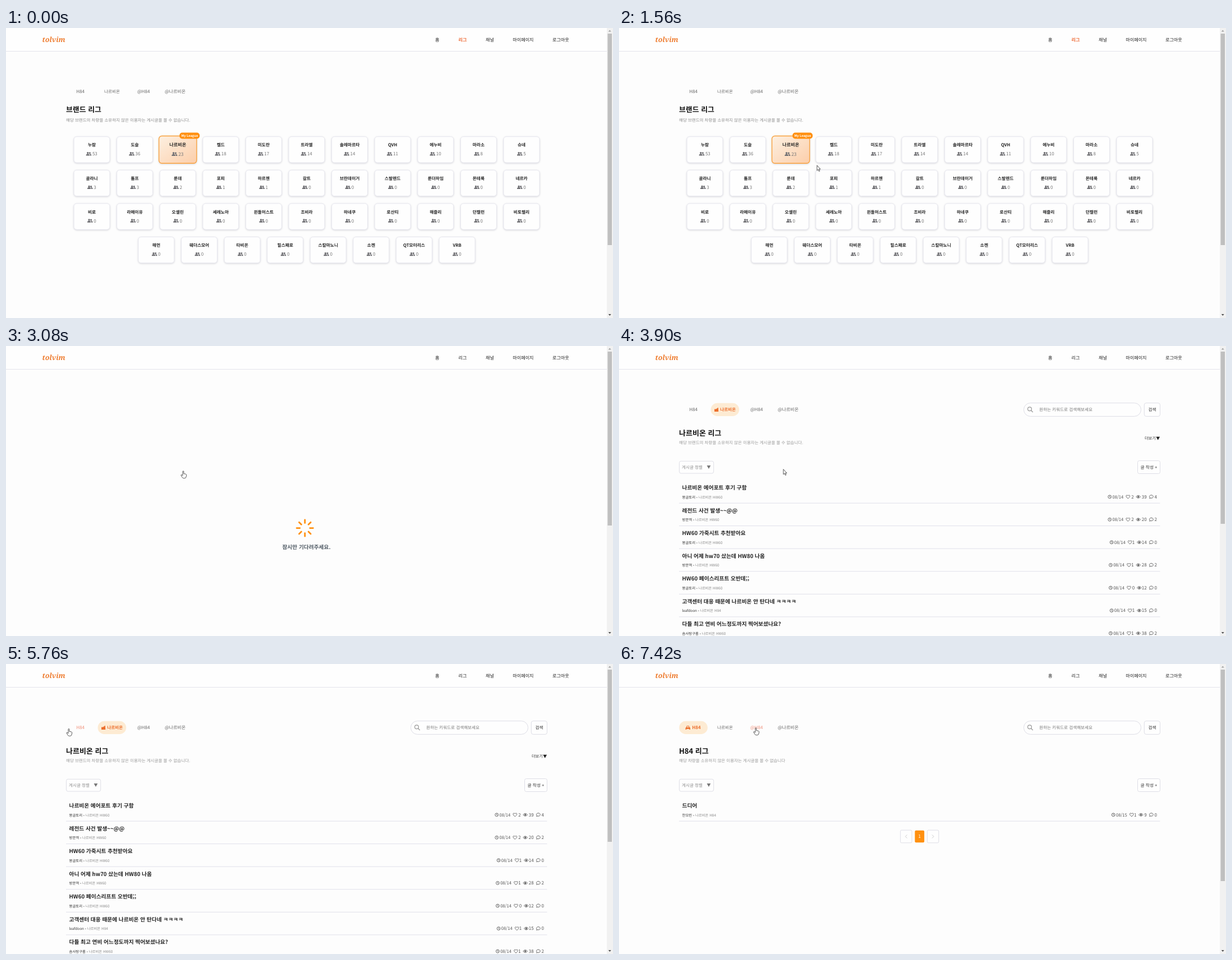
Animation of 1082x517 px, one loop 8000 ms. Source, as an HTML page:

```html
<!DOCTYPE html>
<html lang="ko">
<head>
<meta charset="utf-8">
<title>브랜드 리그</title>
<style>
  html, body { margin: 0; width: 100%; height: 100%; overflow: hidden; background: #fdfdfd; }
  svg { display: block; text-rendering: geometricPrecision;
    font-family: "Noto Sans CJK KR", "Noto Sans CJK", "Noto Sans", sans-serif; }
  .card rect { filter: drop-shadow(0 1.6px 1.7px #00002226); }
  .logo { font-family: "Noto Serif", serif; font-style: italic; }
</style>
</head>
<body>
<svg id="stage" width="1082" height="517" viewBox="0 0 1082 517"></svg>
<script>
const BRAND = '나르비온', MODEL = 'H84';
const ORANGE = '#ff9010', ACTIVE = '#ec6f2d', DARK = '#222', GRAY = '#8c8c8c', EDGE = '#dedee6';

// y is the visual middle of the text
const text = (x, y, s, size = 8, fill = DARK, weight = 400, anchor = 'start', extra = '') =>
  `<text x="${x}" y="${y + size * .36}" font-size="${size}" fill="${fill}" font-weight="${weight}" text-anchor="${anchor}" ${extra}>${s}</text>`;
const mid = (x, y, s, size, fill, weight, extra) => text(x, y, s, size, fill, weight, 'middle', extra);
const box = (x, y, w, h, r, fill = '#fefefe', stroke = EDGE, extra = '') =>
  `<rect x="${x}" y="${y}" width="${w}" height="${h}" rx="${r}" fill="${fill}" stroke="${stroke}" ${extra}/>`;
const icon = (id, x, y) => `<use href="#${id}" x="${x}" y="${y}"/>`;
const line = (x1, y1, x2, y2, c, w = 1) =>
  `<line x1="${x1}" y1="${y1}" x2="${x2}" y2="${y2}" stroke="${c}" stroke-width="${w}"/>`;

const defs = `<defs>
  <linearGradient id="mine" x2="1" y2="1"><stop stop-color="#fdf0e1"/><stop offset="1" stop-color="#fcceaa"/></linearGradient>
  <g id="people" fill="#6e6e72"><circle cx="-1.6" cy="-1.7" r="1.7"/><circle cx="2" cy="-1.7" r="1.5"/>
    <path d="M-4.7 3v-1c0-1.5 2-2 3.1-2s3.1.5 3.1 2v1zM2 0c1 0 2.8.5 2.8 2v1h-2.5v-1q0-1.2-.9-2z"/></g>
  <g id="clock" fill="none" stroke="#555" stroke-width=".9"><circle r="2.9"/><path d="M0-1.7V.2L1.3.9"/></g>
  <path id="heart" d="M0 3C-6-1-2.6-4.6 0-1.8 2.6-4.6 6-1 0 3Z" fill="none" stroke="#555" stroke-width=".9"/>
  <g id="eye"><path d="M-3.8 0Q0-4.8 3.8 0 0 4.8-3.8 0Z" fill="none" stroke="#555" stroke-width=".9"/><circle r="1.5" fill="#555"/></g>
  <path id="chat" d="M-2.9 3l.5-1.6C-4.6-1-2-3 .2-3 4.8-2.8 4.4 2.5.2 2.4L-1.2 2.2Z" fill="none" stroke="#555" stroke-width=".9"/>
  <path id="car" d="M-4.2 3.4V.2L-3-.5-2-3.3H2L3-.5 4.2.2V3.4H2.6V2.3H-2.6V3.4ZM-1.8-.6H1.8L1.3-2.2H-1.3Z" fill="${ACTIVE}" fill-rule="evenodd"/>
  <path id="plant" d="M-3.6 3.4V-1H-1L1.2-2.4V-1L2-3.4H3.2L3.6 3.4Z" fill="${ACTIVE}"/>
  <path id="hand" d="M-1 .8C-1-.5.9-.5.9.8V4.6L4.6 5.4Q5.9 5.8 5.7 7.3L5 10.4Q4.6 12.6 2.6 12.7H.4Q-1 12.6-1.8 11.2L-4 7.6Q-4.3 6.5-3 6.6L-1 8Z"/>
  <path id="arrow" d="M0 0V9.2L2 7.4 3.5 10.7 5 10 3.5 6.8H6.1Z"/>
</defs>`;

// brand grid
const brands = ('누람 53,도슬 36,' + BRAND + ' 23,켈드 18,미도란 17,트라엘 14,솔레마르타 14,QVH 11,에누비 10,마라소 8,슈네 5,' +
  '골라니 3,툼프 3,룬데 2,포피 1,하르첸 1,갈트,브란데이거,스발렌드,룬더하임,몬테룩,네르카,' +
  '비로,라메이유,오셀린,세레노아,윈들허스트,조비라,하네쿠,로산티,해즐리,던켈런,비토렐리,' +
  '해먼,웨더스모어,타비온,힐스패로,스칼마노니,소켄,QT모터리스,VRB').split(',')
  .map((entry, i) => {
    const [name, count = '0'] = entry.split(' '), row = Math.floor(i / 11);
    return { name, count, x: (row < 3 ? 153 : 267.9) + i % 11 * 76.6, y: 216.9 + row * 59.6 };
  });
const mine = brands[2];
const cardArt = b => {
  const own = b === mine, half = b.count.length * 2.3;
  return `<g class="card">` +
    box(-32, -23.2, 64, 46.4, 5, own ? 'url(#mine)' : '#fefefe', own ? '#f9a23f' : '#e6e6ee', own ? 'stroke-width="1.3"' : '') +
    mid(0, -8.2, b.name, 7.7, DARK, 700) + icon('people', -half - 1, 7.6) +
    text(5.5 - half, 7.6, b.count, 8, '#777') + '</g>';
};

// tab strip
const tabX = i => 132.6 + i * 56.3;
const tabs = active => [MODEL, BRAND, '@' + MODEL, '@' + BRAND].map((s, i) => {
  const on = i === active;
  return (on ? box(tabX(i) - 25.3, 101.8, 50.6, 23.2, 11.6, '#fdebd3', 'none') +
      icon(i ? 'plant' : 'car', tabX(i) - (i ? 15.2 : 9.8), 113.5) : '') +
    mid(tabX(i) + (on ? 5.4 : 0), 113.3, s, i === 1 ? 7.6 : 8, on ? ACTIVE : '#666', on ? 600 : 400, on ? '' : `data-tab="${i}"`);
}).join('');

// post list
const charW = c => c === '1' ? 3.1 : 4.8;
function stats(y, date, counts) {
  let right = 959, out = '';
  ['chat', 'eye', 'heart'].forEach((id, i) => {
    const s = String(counts[2 - i]), left = right - [...s].reduce((w, c) => w + charW(c), 0);
    out += text(right, y, s, 8, '#555', 400, 'end') + icon(id, left - 5.5, y);
    right = left - 13.5;
  });
  return out + text(right, y, date, 7.6, '#555', 400, 'end') + icon('clock', right - 24.6, y);
}
const post = ([title, user, model, ...counts], i, date) => {
  const y = 252.6 + i * 40.55;
  return text(112.5, y, title, 9.7, DARK, 700) +
    text(112.5, y + 16.6, `${user} <tspan fill="#888">• ${BRAND} ${model}</tspan>`, 6.4, '#333') +
    stats(y + 16.2, date, counts) + line(107, y + 27.5, 964.5, y + 27.5, '#e0e0ea');
};
const board = (active, title, note, posts, date) => tabs(active) +
  box(721.5, 101.6, 209, 23.8, 11.9) +
  `<circle cx="732" cy="112.3" r="3.4" fill="none" stroke="#999" stroke-width="1.2"/>` + line(734.5, 114.8, 737.7, 118, '#999', 1.3) +
  text(749, 113.5, '원하는 키워드로 검색해보세요', 7.6, '#777') +
  box(936.3, 101.6, 28.2, 23.8, 3.5) + mid(950.4, 113.5, '검색', 7.5, DARK, 500) +
  text(107, 155.4, title + ' 리그', 13, '#111', 600) + text(107, 172.4, note, 7.5, '#999') +
  box(107.5, 205.3, 61.2, 21.7, 3) + text(112, 216, '게시글 정렬', 7.6, GRAY) +
  `<path d="M156.6 213h6.8l-3.4 6z" fill="#777"/>` +
  box(924.5, 204.5, 40, 23, 3) + mid(944.5, 216, '글 작성 +', 7.7, '#333') +
  posts.map((p, i) => post(p, i, date)).join('');

const topics = [
  [BRAND + ' 에어포트 후기 구함', '몽글토리', 'HW60', 2, 39, 4],
  ['레전드 사건 발생~~@@', '방문객', 'HW60', 2, 20, 2],
  ['HW60 가죽시트 추천받아요', '몽글토리', 'HW60', 1, 14, 0],
  ['아니 어제 hw70 샀는데 HW80 나옴', '방문객', 'HW60', 1, 28, 2],
  ['HW60 페이스리프트 오반데;;', '몽글토리', 'HW60', 0, 12, 0],
  [`고객센터 대응 때문에 ${BRAND} 안 탄다네 ㅋㅋㅋㅋ`, 'leafdoon', MODEL, 1, 15, 0],
  ['다들 최고 연비 어느정도까지 찍어보셨나요?', '솜사탕구름', 'HW60', 1, 38, 2],
];
const spokes = [...Array(8)].map((_, i) =>
  `<line x1="9" x2="14.6" stroke="${ORANGE}" stroke-width="2.8" stroke-linecap="round" transform="translate(532.8 324.6) rotate(${i * 45})"/>`).join('');
const warn = '이용자는 게시글을 볼 수 없습니다';

const scenes = {
  grid: tabs(-1) + text(107, 145, '브랜드 리그', 12.9, '#111', 600) +
    text(107, 164, `해당 브랜드의 차량을 소유하지 않은 ${warn}.`, 7.5, GRAY) +
    brands.map((b, i) => `<g id="card${i}">${cardArt(b)}</g>`).join('') +
    box(309.2, 186.6, 36, 10.8, 5, ORANGE, 'none') + mid(327.3, 192, 'My League', 5.7, '#fff', 700),
  load: spokes + mid(535.5, 359, '잠시만 기다려주세요.', 9.7, '#4f5a64', 600),
  list: board(1, BRAND, `해당 브랜드의 차량을 소유하지 않은 ${warn}.`, topics, '08/14') +
    text(937, 164.7, '더보기', 7.2, '#333') + `<path d="M957.3 161.8h6.8l-3.4 6z" fill="#222"/>`,
  model: board(0, MODEL, `해당 차량을 소유하지 않은 ${warn}`, [['드디어', '한모린', MODEL, 1, 9, 0]], '08/15') +
    box(501.7, 296.2, 20.3, 22.6, 2) + box(527.4, 296.8, 16.8, 21.4, 2, ORANGE, 'none') + box(549.5, 296.2, 20.3, 22.6, 2) +
    mid(535.8, 307.6, '1', 8, '#fff') +
    `<path d="M513.5 304.5l-3 3 3 3M558 304.5l3 3-3 3" fill="none" stroke="#ccc"/>`,
};
const thumbEnd = { grid: 387, load: 320, list: 317, model: 387 };

const nav = [['홈', 765], ['리그', 806.5], ['채널', 855], ['마이페이지', 903.3], ['로그아웃', 974]];
const stage = document.getElementById('stage');
stage.innerHTML = defs + '<rect width="1082" height="517" fill="#fdfdfd"/>' +
  '<rect width="1071" height="41" fill="#fefefe"/>' + line(0, 41.5, 1071, 41.5, '#e4e4ec') +
  text(64.5, 20, 'tolvim', 12.5, '#ee7d31', 700, 'start', 'class="logo"') +
  nav.map(([s, x], i) => text(x, 20.7, s, 8.1, DARK, 400, 'start', `id="nav${i}"`)).join('') +
  Object.entries(scenes).map(([id, art]) => `<g id="${id}">${art}</g>`).join('') +
  '<rect x="1071" width="11" height="517" fill="#f1f1f1"/><rect id="thumb" x="1072.5" y="10" width="7.5" fill="#bfbfbf"/>' +
  '<path d="M1073.7 6.6h5l-2.5-3z" fill="#a3a3a3"/><path d="M1073.7 510h5l-2.5 3z" fill="#505050"/>' +
  '<use id="cursor" fill="#fff" stroke="#444" stroke-width=".9" stroke-linejoin="round"/>';
const $ = id => document.getElementById(id);

// pointer tip: time, x, y
const path = [[680, 1070, 300], [980, 612, 272], [1090, 608, 271], [1100, 390, 260], [1420, 372, 254], [1820, 318, 228],
  [2100, 316, 223], [3620, 316, 223], [3900, 293, 219.7], [4900, 110.5, 123], [5180, 112, 115.6], [7040, 112, 115.6], [7420, 244, 114]];
function tip(t) {
  if (t < path[0][0]) return [-99, -99];
  if (t > 3620 && t < 4740) t -= (t - 3620) % 140;   // the pointer moves in steps here
  const i = path.findIndex(p => p[0] > t);
  if (i < 0) return path[path.length - 1].slice(1);
  const [a, ax, ay] = path[i - 1], [b, bx, by] = path[i], k = (t - a) / (b - a);
  return [ax + (bx - ax) * k, ay + (by - ay) * k];
}
const cardAt = ([x, y]) => brands.findIndex(b => Math.abs(x - b.x) < 32.5 && Math.abs(y - b.y) < 23.5);
const tabAt = ([x, y]) => [0, 1, 2, 3].findIndex(i => Math.hypot(Math.max(Math.abs(x - tabX(i)) - 13.7, 0), y - 113.4) < 11.6);
const sceneAt = t => t < 3080 ? 'grid' : t < 3340 ? 'load' : t < 6720 ? 'list' : t < 6860 ? 'load' : 'model';

function draw(t) {
  const scene = sceneAt(t), p = tip(t), tab = tabAt(p);
  for (const id in scenes) $(id).style.display = id === scene ? '' : 'none';
  $('thumb').setAttribute('height', thumbEnd[scene] - 10);
  $('nav1').setAttribute('fill', scene === 'grid' ? '#ee6a35' : DARK);
  $('nav1').setAttribute('font-weight', scene === 'grid' ? 600 : 400);

  if (scene === 'grid') {
    // hover lift follows the share of the last 150 ms spent on a card
    const lift = brands.map(() => 0);
    for (let s = 0; s < 150; s += 10) {
      const i = cardAt(tip(t - s));
      if (i >= 0) lift[i] += 1 / 15;
    }
    brands.forEach((b, i) => {
      const k = b === mine ? 0 : lift[i], size = b === mine ? 1.05 : 1 + .03 * k;
      $('card' + i).setAttribute('transform', `translate(${b.x} ${b.y - 2 * k}) scale(${size})`);
    });
    $('card2').querySelector('rect').style.filter = lift[2] > .5 ? 'drop-shadow(0 1.6px 1.8px #ff901055)' : '';
  }
  $(scene).querySelectorAll('[data-tab]').forEach(el =>
    el.setAttribute('fill', +el.dataset.tab === tab ? '#f0907a' : '#666'));

  const hand = scene === 'load' || (scene === 'grid' ? cardAt(p) >= 0 : tab >= 0);
  $('cursor').setAttribute('href', hand ? '#hand' : '#arrow');
  $('cursor').setAttribute('transform', `translate(${p})`);
}
function tick() {
  draw(performance.now() % 8000);
  requestAnimationFrame(tick);
}
tick();
</script>
</body>
</html>
```
